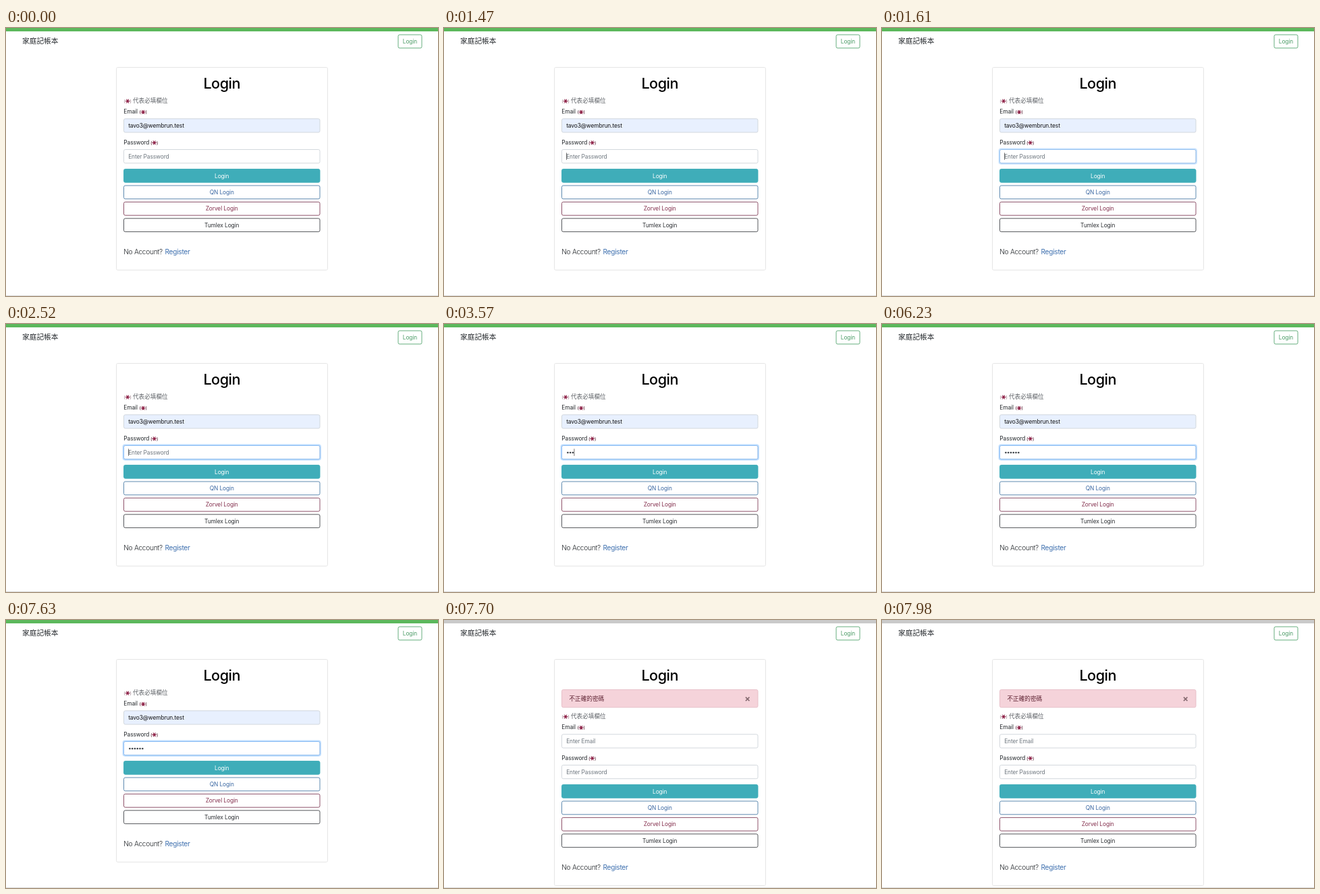
Write an HTML page that moves like this. It is 640x398 px and loops after 8 s.

```html
<!DOCTYPE html>
<html lang="zh-Hant">
<head>
<meta charset="utf-8">
<title>Login</title>
<style>
html, body { margin: 0; width: 100%; height: 100%; overflow: hidden; background: #fff; }
svg { display: block; width: 100%; height: 100%; }
text {
  font: 400 8.4px Inter, "Noto Sans CJK TC", "Noto Sans CJK", sans-serif;
  letter-spacing: -.1px;
  fill: #24282c;
}
.mid { text-anchor: middle; }
.title { font-size: 21.6px; font-weight: 500; letter-spacing: -.5px; fill: #000; }
.brand { font-size: 10.7px; letter-spacing: 0; }
.lead { font-size: 10.2px; font-weight: 300; letter-spacing: -.3px; }
.link { font-weight: 400; fill: #3d6fae; }
.han { font-size: 8.6px; letter-spacing: 0; }
.note { font-weight: 500; fill: #5d6166; }
.hint { fill: #6c757d; }
.typed { fill: #111; }
.paren { font-size: 6.6px; font-weight: 500; letter-spacing: 0; fill: #5f3342; }
.pale { fill: #a88f98; }
.close { font-size: 13px; font-weight: 700; fill: #856a70; }
</style>
</head>
<body>
<svg id="stage" viewBox="0 0 640 398" preserveAspectRatio="none"></svg>
<script>
const LOOP = 8000, FOCUS = 1470, REPLY = 7700, SHIFT = 35;
const KEYS = [2940, 3220, 3570, 3920, 4270, 4620];
const CARET_ON = [[1470, 1960], [2520, 5110], [5670, 6230]];
const PITCH = 3.78;

const stage = document.getElementById("stage");

function add(parent, tag, attrs = {}, content) {
  const el = document.createElementNS("http://www.w3.org/2000/svg", tag);
  for (const k in attrs) el.setAttribute(k, attrs[k]);
  if (content) el.textContent = content;
  return parent.appendChild(el);
}
const group = parent => add(parent, "g");
const label = (parent, x, y, str, cls = "", fill) => {
  const el = add(parent, "text", { x, y, class: cls }, str);
  if (fill) el.style.fill = fill;
  return el;
};
const box = (parent, x, y, width, height, fill, stroke = "none", rx = 2.2) =>
  add(parent, "rect", { x, y, width, height, fill, stroke, rx, "stroke-width": .9 });

const field = (parent, y, fill) => box(parent, 174.5, y, 290.5, 20.2, fill, "#ced4da");

function button(parent, y, str, color, fill = "#fff", ink = color) {
  box(parent, 174.5, y, 290.5, 19.8, fill, color);
  label(parent, 319.7, y + 13, str, "mid", ink);
}

// Bracketed six-armed star marking a required field
function required(parent, x, y, cls = "") {
  label(parent, x - 5.6, y + 2.2, "(", "paren " + cls);
  label(parent, x + 3.4, y + 2.2, ")", "paren " + cls);
  let d = "";
  for (let i = 0; i < 3; i++) {
    const a = i * Math.PI / 3, dx = 3.3 * Math.cos(a), dy = 3.3 * Math.sin(a);
    d += `M${x - dx} ${y - dy}L${x + dx} ${y + dy}`;
  }
  add(parent, "path", { d, stroke: "#8c1f45", "stroke-width": 1.25 });
}

// Page frame and navigation
box(stage, 0, 0, 640, 398, "#fff", "none", 0);
const topBar = box(stage, 0, 0, 640, 5, "#5cb85c", "none", 0);
box(stage, 0, 397.2, 640, .8, "#d2d2d2", "none", 0);
label(stage, 24, 23.4, "家庭記帳本", "brand");
box(stage, 581, 10, 35, 19.8, "#fff", "#55a570");
label(stage, 598.5, 22.8, "Login", "mid", "#4c9c67");

// Card
const card = box(stage, 163.5, 58.5, 313, 301, "#fff", "#e2e2e2");
label(stage, 319.7, 90.2, "Login", "title mid");

const alertBox = group(stage);
box(alertBox, 174.5, 103.5, 290.5, 26.3, "#f5d3da", "#e6bcc6");
label(alertBox, 185.5, 120, "不正確的密碼", "han", "#5c2030");
label(alertBox, 449.5, 122.2, "×", "close mid");

const form = group(stage);
required(form, 180.2, 108.6, "pale");
label(form, 188, 111.4, "代表必填欄位", "han note");
label(form, 174.3, 127.4, "Email");
required(form, 203.2, 124.8);
label(form, 174.3, 173, "Password");
required(form, 219.7, 170.4);

const emailField = field(form, 134.8);
const email = label(form, 181.2, 148, "tavo3@wembrun.test", "typed");
const emailHint = label(form, 181.2, 148, "Enter Email", "hint");

const ring = add(form, "rect", {
  x: 173.4, y: 179.4, width: 292.7, height: 22.4, rx: 3,
  fill: "none", stroke: "#bfdeff", "stroke-width": 1.7
});
field(form, 180.5, "#fff");
const focusEdge = box(form, 174.5, 180.5, 290.5, 20.2, "none", "#7fb8f6");
const passHint = label(form, 181.2, 193.7, "Enter Password", "hint");
const dots = KEYS.map((_, i) =>
  add(form, "circle", { cx: 183.4 + PITCH * i, cy: 191, r: 1.35, fill: "#40464c" }));
const caret = box(form, 181.2, 185.3, .8, 10.6, "#555", "none", 0);

button(form, 209.5, "Login", "#3fadb9", "#3fadb9", "#fff");
button(form, 234, "QN Login", "#4d7da8", "#fff", "#3a67a2");
button(form, 258.4, "Zorvel Login", "#82405a", "#fff", "#84304e");
button(form, 282.8, "Tumlex Login", "#43464a", "#fff", "#2c2f33");

label(form, 174.2, 335.6, "No Account?", "lead");
label(form, 235.5, 335.6, "Register", "lead link");

const show = (el, on) => el.setAttribute("visibility", on ? "visible" : "hidden");
const ease = u => u * u * (3 - 2 * u);

function draw(t) {
  const failed = t >= REPLY;
  const count = failed ? 0 : KEYS.filter(k => t >= k).length;
  const glow = failed ? 0 : ease(Math.min(1, Math.max(0, (t - FOCUS) / 190)));

  topBar.setAttribute("fill", failed ? "#cacaca" : "#5cb85c");
  card.setAttribute("height", failed ? 301 + SHIFT : 301);
  form.setAttribute("transform", `translate(0 ${failed ? SHIFT : 0})`);
  show(alertBox, failed);
  emailField.setAttribute("fill", failed ? "#fff" : "#e8f0fe");
  show(email, !failed);
  show(emailHint, failed);

  ring.setAttribute("opacity", glow);
  focusEdge.setAttribute("opacity", glow);
  show(passHint, count === 0);
  dots.forEach((dot, i) => show(dot, i < count));
  caret.setAttribute("x", 181.2 + PITCH * count);
  show(caret, CARET_ON.some(([from, to]) => t >= from && t < to));
}

function tick() {
  draw(performance.now() % LOOP);
  requestAnimationFrame(tick);
}
tick();
</script>
</body>
</html>
```
